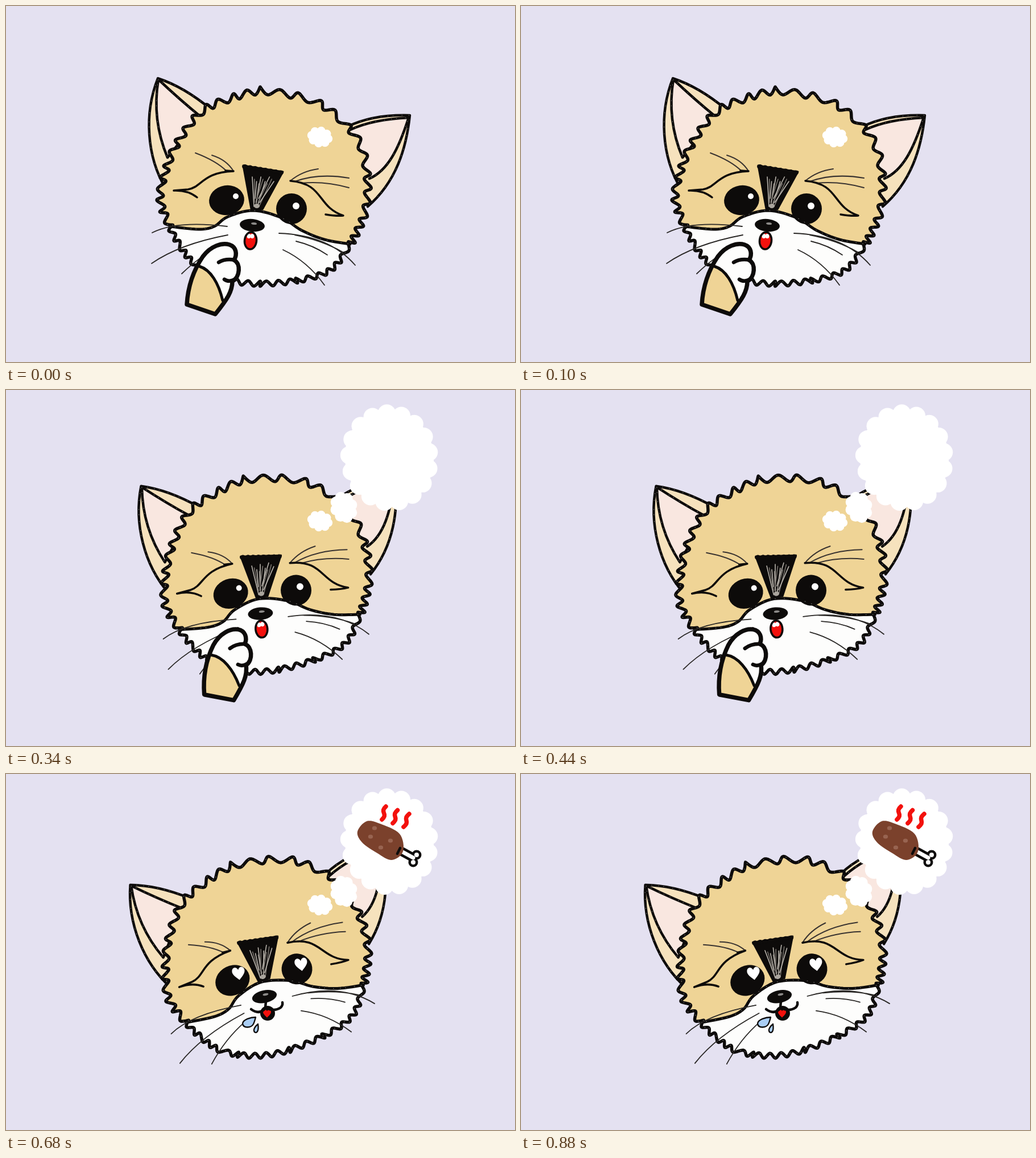
Recreate the animation shown at these times as an HTML page with a canvas. Size 895x625 px, loop 1020 ms.

```html
<!DOCTYPE html>
<html lang="en">
<head>
<meta charset="utf-8">
<style>
html, body { margin: 0; width: 100%; height: 100%; overflow: hidden; background: #e4e1f1; }
canvas { display: block; }
</style>
</head>
<body>
<canvas id="stage" width="895" height="625"></canvas>
<script>
const ctx = document.getElementById('stage').getContext('2d');
const INK = '#0d0b0a', TAN = '#efd496', CREAM = '#f6e2bd', PINK = '#f9e7e0', WHITE = '#fdfdfc', RED = '#f3110d';

const pairs = text => text.split(' ').map(p => p.split(',').map(Number));

// Dense points on a smooth curve through key points
function smooth(keys, closed) {
  const len = keys.length, out = [];
  const at = i => closed ? keys[(i + len) % len] : keys[Math.max(0, Math.min(len - 1, i))];
  for (let i = 0; i < (closed ? len : len - 1); i++) {
    const [a, b, c, d] = [at(i - 1), at(i), at(i + 1), at(i + 2)];
    for (let u = 0; u < 1; u += 1 / 8) {
      out.push([0, 1].map(k => b[k] + u * (c[k] - a[k]) / 2
        + u * u * (a[k] - 2.5 * b[k] + 2 * c[k] - d[k] / 2)
        + u * u * u * (1.5 * (b[k] - c[k]) + (d[k] - a[k]) / 2)));
    }
  }
  return closed ? out : [...out, keys[len - 1]];
}

// Tufts along a base curve: every second point is pushed away from the head's middle
function fur(base, steps, depth, power) {
  const pts = smooth(pairs(base)), dist = [0];
  for (let i = 1; i < pts.length; i++) {
    dist.push(dist[i - 1] + Math.hypot(pts[i][0] - pts[i - 1][0], pts[i][1] - pts[i - 1][1]));
  }
  const tufts = [];
  for (let i = 0; i <= steps; i++) {
    const goal = dist.at(-1) * (i / steps) ** power;
    const [x, y] = pts[dist.findIndex(d => d >= goal - .01)];
    const push = 1 + (i % 2 ? depth : -depth) / Math.hypot(x - 450, y - 315);
    tufts.push([450 + (x - 450) * push, 315 + (y - 315) * push]);
  }
  return smooth(tufts);
}

function trace(points, closed) {
  const path = new Path2D();
  points.forEach(p => path.lineTo(...p));
  if (closed) path.closePath();
  return path;
}

function fill(path, color) {
  ctx.fillStyle = color;
  ctx.fill(path);
}

function line(path, width, color = INK) {
  ctx.lineWidth = width;
  ctx.strokeStyle = color;
  ctx.stroke(path);
}

// Ink line with small dry-brush gaps
function crayon(path, width) {
  line(path, width);
  ctx.setLineDash([1, 8, 1, 15, 1, 11]);
  line(path, 1, 'rgba(255,255,255,.45)');
  ctx.setLineDash([]);
}

function oval(x, y, rx, ry = rx, turn = 0) {
  const path = new Path2D();
  path.ellipse(x, y, rx, ry, turn, 0, 7);
  return path;
}

function heart(x, y, s, turn, color) {
  ctx.save();
  ctx.translate(x, y);
  ctx.rotate(turn);
  ctx.scale(s, s);
  fill(new Path2D('M0 1.1C-.5 .6-1.1 .1-1-.45C-.9-1.1-.2-1.1 0-.5C.2-1.1 .9-1.1 1-.45C1.1 .1 .5 .6 0 1.1Z'), color);
  ctx.restore();
}

// Oval with a ring of round puffs
function cloud(x, y, rx, ry, puffs, r, turn) {
  fill(oval(x, y, rx + r / 2, ry + r / 2, turn), '#fff');
  for (let i = 0; i < puffs; i++) {
    const a = i / puffs * 2 * Math.PI, cx = rx * Math.cos(a), cy = ry * Math.sin(a);
    fill(oval(x + cx * Math.cos(turn) - cy * Math.sin(turn), y + cx * Math.sin(turn) + cy * Math.cos(turn), r), '#fff');
  }
}

function place(x, y, dx, dy, degrees, draw) {
  ctx.save();
  ctx.translate(x + dx, y + dy);
  ctx.rotate(degrees * Math.PI / 180);
  ctx.translate(-x, -y);
  draw();
  ctx.restore();
}

const leftFur = fur('288,387 271,340 281,288 303,238 343,186 395,162 447,148', 29, 6, 1.15);
const rightFur = fur('607,417 632,360 635,295 618,234 568,182 520,160 447,148', 29, 6, 1.4).reverse();
const chinFur = fur('605,418 568,465 490,485 405,484 335,455 299,410 288,387', 42, 4.5, 1);
const lipLine = smooth(pairs('288,387 338,392 366,387 390,370 435,359 485,372 520,394 560,410 605,418'));
const head = trace([...leftFur, ...rightFur, ...chinFur], true);
const muzzle = trace([...lipLine, ...chinFur], true);
const lip = trace(lipLine);

const whiskers = new Path2D(`M257 398Q300 376 389 387M256 452Q305 418 390 402M309 470Q345 435 387 417
  M480 399Q568 402 614 455M508 402Q555 411 592 432M510 413Q540 420 565 437M487 428Q530 448 560 490`);
const browHairs = new Path2D(`M333 258Q370 272 388 290M362 262Q388 270 400 290
  M500 307Q520 290 549 286M508 308Q550 293 603 302M519 311Q560 307 603 319`);
const brows = new Path2D(`M400 290C345 292 345 318 320 322L295 324Q320 323 336 336
  M400 290L386 289M500 307C560 312 546 352 593 368Q580 369 562 366`);

function ears() {
  const leftIn = 'M268 129Q256 200 284 266L342 194Q305 164 268 129';
  const rightIn = 'M606 217Q645 199 708 196C690 252 671 289 639 303';
  const left = new Path2D('M280 319C248 265 242 190 267 127Q313 142 360 181');
  const right = new Path2D('M600 212Q645 190 710 192C704 250 686 309 636 352');
  [[left, leftIn], [right, rightIn]].forEach(([outer, inner]) => {
    fill(outer, CREAM);
    fill(new Path2D(inner), PINK);
    crayon(outer, 4.5);
    crayon(new Path2D(inner), 4.5);
  });
}

function foreheadPatch() {
  const shape = new Path2D('M417 280L487 291L451 357L431 356Z');
  fill(shape, INK);
  line(shape, 3);
  for (let i = 0; i < 8; i++) fill(oval(420 + i * 9, 282 + i * 1.5, 5, 4), INK);
  for (let i = 0; i < 11; i++) {
    const y = 300 + i % 4 * 4;
    line(new Path2D(`M${436 + i} ${352 - i % 3 * 7}L${433 + i * 3.8} ${y}`), 1.6, i % 2 ? '#77726c' : '#bab5ad');
  }
  fill(oval(441, 351, 5, 4), '#aaa59d');
}

function face(happy) {
  ears();
  fill(head, TAN);
  fill(muzzle, WHITE);
  crayon(head, 5.5);
  foreheadPatch();
  fill(oval(388, 341, 31, 26, -.15), INK);
  fill(oval(502, 356, 27), INK);
  crayon(lip, 5);
  line(browHairs, 2, '#393330');
  line(brows, 3.5);
  line(whiskers, 1.8, '#292725');
  fill(oval(433, 385, 22, 11, .1), INK);
  fill(oval(436, 382, 5, 2, .1), '#8c8a88');
  if (happy) {
    heart(402, 332, 11, .16, '#fff');
    heart(511.6, 350, 11, .16, '#fff');
  } else {
    fill(oval(404, 334, 5), '#fff');
    fill(oval(510, 351, 6), '#fff');
    const mouth = oval(430, 412, 10.5, 15, .1);
    fill(mouth, RED);
    fill(oval(427, 404, 3.5, 4), '#fff');
    fill(oval(433, 404, 3.5, 4), '#fff');
    line(mouth, 3.5);
  }
}

function paw() {
  const hand = new Path2D('M318 524C320 490 331 462 346 440C360 421 380 415 393 419C405 423 407 436 401 446C413 452 412 476 398 483C398 501 389 515 368 541Z');
  const cuff = 'M340 457C360 463 374 487 381 517';
  fill(hand, WHITE);
  fill(new Path2D(cuff + 'L368 541L318 524Q321 490 340 457'), TAN);
  line(hand, 7.5);
  line(new Path2D(cuff), 5);
  line(new Path2D('M374 450Q386 443 402 446M384 480Q391 485 400 481'), 6.5);
}

function smileAndDrops() {
  fill(oval(460, 420, 13), INK);
  heart(459, 420, 7, 0, RED);
  line(new Path2D('M457 399L456 410M431 413Q446 424 457 410Q471 418 483 410Q487 406 486 401'), 4.5);
  const drops = new Path2D('M439 427C430 427 417 431 416 438C417 447 431 446 435 439C437 435 438 431 439 427ZM443 439C438 443 434 449 437 453C441 456 445 451 443 439Z');
  fill(drops, '#a9cdf4');
  line(drops, 2.3);
}

function meat() {
  const shaft = new Path2D('M694 135L716 147');
  [[INK, 4.5], ['#fff', 0]].forEach(([color, edge]) => {
    line(shaft, 7 + edge * 2, color);
    fill(oval(722, 142, 4 + edge), color);
    fill(oval(716, 155, 4 + edge), color);
  });
  fill(trace(smooth(pairs('618,101 634,83 657,87 692,105 698,136 678,151 653,139 626,120'), true)), '#7b412c');
  line(new Path2D('M693 130L688 140'), 4.5);
  [[648, 95], [641, 110], [676, 117], [659, 129]].forEach(([x, y]) => fill(oval(x, y, 4.2, 3.6), '#986451'));
  for (let i = 0; i < 3; i++) {
    const wave = new Path2D();
    for (let u = 0; u <= 1; u += .125) {
      wave.lineTo(668 + i * 20.5 - (7 + i * 1.5) * u - 2.5 * Math.sin(u * 2 * Math.PI), 57 + i * 6.5 + 23 * u);
    }
    line(wave, 7.5, RED);
  }
}

// Poses: dx, dy, degrees
const headPose = [[0, 0, 0], [.6, 2.9, -5.3], [1.4, 4.7, -10.4], [2.4, 7.3, -13.6], [-.6, 2.4, -17.5]];
const pawPose = [[0, 0, 0], [13, 4, -8], [25, 4, -8], [32, 7, -14]];

function draw(step) {
  const happy = step === 4;
  ctx.fillStyle = '#e4e1f1';
  ctx.fillRect(0, 0, 895, 625);
  ctx.lineCap = ctx.lineJoin = 'round';
  place(455, 315, ...headPose[step], () => face(happy));
  if (happy) smileAndDrops();
  else place(369, 487, ...pawPose[step], paw);
  cloud(552, 230, 15, 11, 8, 7.5, .2);
  if (step > 0) cloud(594, 206, 14, 18, 8, 10, -.3);
  if (step > 1) cloud(674, 119, 70, 78, 17, 16, -.14);
  if (step > 2) meat();
}

let shown = -1;
const start = performance.now();
function tick() {
  const step = Math.min(4, Math.floor((performance.now() - start) % 1020 / 170));
  if (step !== shown) draw(shown = step);
  requestAnimationFrame(tick);
}
tick();
</script>
</body>
</html>
```
